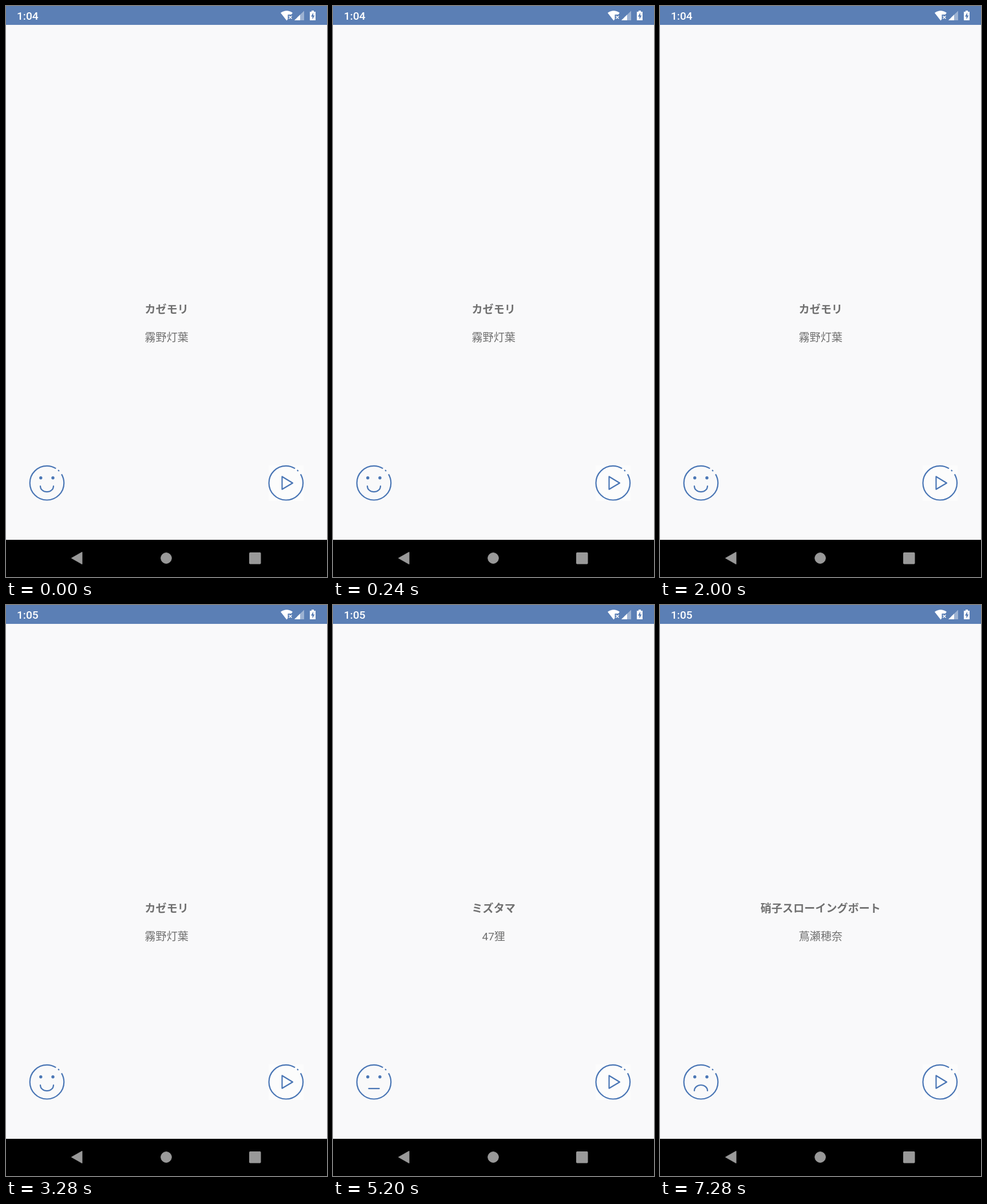
These frames come from a looping animation (561x998 px, 8000 ms). An HTML page:

```html
<!DOCTYPE html>
<html lang="ja">
<head>
<meta charset="utf-8">
<title>Mood player</title>
<style>
  html, body { margin: 0; width: 100%; height: 100%; overflow: hidden; background: #f9f9fa; }
  svg { display: block; width: 100%; height: 100%; }
  text { font: 19.1px Roboto, "Noto Sans CJK JP", "Noto Sans CJK", sans-serif; }
  .label { fill: #707070; text-anchor: middle; }
  .line { fill: none; stroke: #4a76b5; stroke-width: 2.2; stroke-linecap: round; stroke-linejoin: round; }
  .solid { fill: #4a76b5; }
</style>
</head>
<body>
<svg viewBox="0 0 561 998">
  <defs>
    <!-- Ring broken at the upper right, with a short dash in the gap -->
    <circle id="ring" r="29.8" class="line" pathLength="360"
            stroke-dasharray="302 9 5 13 31 0" style="stroke-linecap:butt"/>
    <g id="eyes" class="solid"><circle cx="-10.7" cy="-9" r="2.7"/><circle cx="10.5" cy="-9" r="2.7"/></g>
    <g id="happy">
      <use href="#ring"/><use href="#eyes"/>
      <path class="line" d="M-11.5 5.5A11.5 10 0 0 0 11.5 5.5"/>
    </g>
    <g id="neutral">
      <use href="#ring"/><use href="#eyes"/>
      <path class="line" d="M-9 11.5H9.2"/>
    </g>
    <g id="sad">
      <use href="#ring"/><use href="#eyes"/>
      <path class="line" d="M-11.5 15.3A11.5 10 0 0 1 11.5 15.3"/>
    </g>
    <g id="dizzy">
      <use href="#ring"/>
      <path class="line" d="M-13.5-9.3L-8-5L-13.5-.8M13.5-9.3L8-5L13.5-.8"/>
      <ellipse class="solid" cy="13.5" rx="3.6" ry="2.7"/>
    </g>
  </defs>

  <rect width="561" height="998" fill="#f9f9fa"/>

  <!-- Status bar -->
  <rect width="561" height="33" fill="#5b7fb5"/>
  <g fill="#fff">
    <text id="clock" x="19" y="24" font-weight="500" style="font-weight:500"></text>
    <path d="M490.5 25.5L480 12Q490.5 4.500 501 12L498.500 15H492.500V23Z"/>
    <path d="M494.500 17.200L499.500 22.200M499.500 17.200L494.500 22.200" stroke="#fff" stroke-width="1.500"/>
    <path d="M504 25L521 8.500V25Z" opacity=".4"/>
    <path d="M504 25L514 15.300V25Z"/>
    <path d="M534 8h4v2h3v15h-10V10h3Z"/>
    <path d="M537 11.500L533 18.500H535.500V23.500L539.500 16.500H537Z" fill="#5b7fb5"/>
  </g>

  <text id="title" class="label" x="280.700" y="537" style="font-weight:700"></text>
  <text id="artist" class="label" x="280.700" y="585.700"></text>

  <g id="menu">
    <rect x="41.800" y="565" width="60" height="298.500" rx="30" fill="#fcfcfc" stroke="#cfe5ec" stroke-width="1.600"/>
    <use href="#dizzy" x="71.500" y="595.200"/>
    <use id="option" x="71.500" y="670"/>
    <use href="#sad" x="71.500" y="745"/>
  </g>
  <use id="mood" x="71.500" y="833.700"/>

  <!-- Play button -->
  <rect x="459" y="803" width="61" height="62" fill="#fcfcfc"/>
  <g transform="translate(489.300 833.700)">
    <use href="#ring"/>
    <path class="line" d="M-6.800-11.200V11L11.700 0Z"/>
  </g>

  <!-- Navigation bar -->
  <rect y="933" width="561" height="65"/>
  <g fill="#999" stroke="#999" stroke-linejoin="round">
    <path d="M114.500 965L133 954.500V975.500Z"/>
    <circle cx="280" cy="965" r="9.300"/>
    <rect x="425.500" y="955.500" width="19.500" height="19.500" rx="1"/>
  </g>
</svg>
<script>
const LOOP = 8000;
const songs = [
  { from: 0, title: "カゼモリ", artist: "霧野灯葉" },
  { from: 5200, title: "ミズタマ", artist: "47狸" },
  { from: 7280, title: "硝子スローイングボート", artist: "蔦瀬穂奈" },
];
const moods = [
  { from: 0, face: "happy", option: "neutral" },
  { from: 4880, face: "neutral", option: "happy" },
  { from: 6960, face: "sad", option: "neutral" },
];
const menuOpen = [[3960, 4880], [6400, 6960]];

const byId = id => document.getElementById(id);
const current = (list, t) => list.findLast(item => t >= item.from);

function draw(t) {
  const song = current(songs, t), mood = current(moods, t);
  byId("clock").textContent = t < 3280 ? "1:04" : "1:05";
  byId("title").textContent = song.title;
  byId("artist").textContent = song.artist;
  byId("mood").setAttribute("href", "#" + mood.face);
  byId("option").setAttribute("href", "#" + mood.option);
  const open = menuOpen.some(([start, end]) => t >= start && t < end);
  byId("menu").style.display = open ? "" : "none";
}

const start = performance.now();
function tick() {
  draw((performance.now() - start) % LOOP);
  requestAnimationFrame(tick);
}
tick();
</script>
</body>
</html>
```
